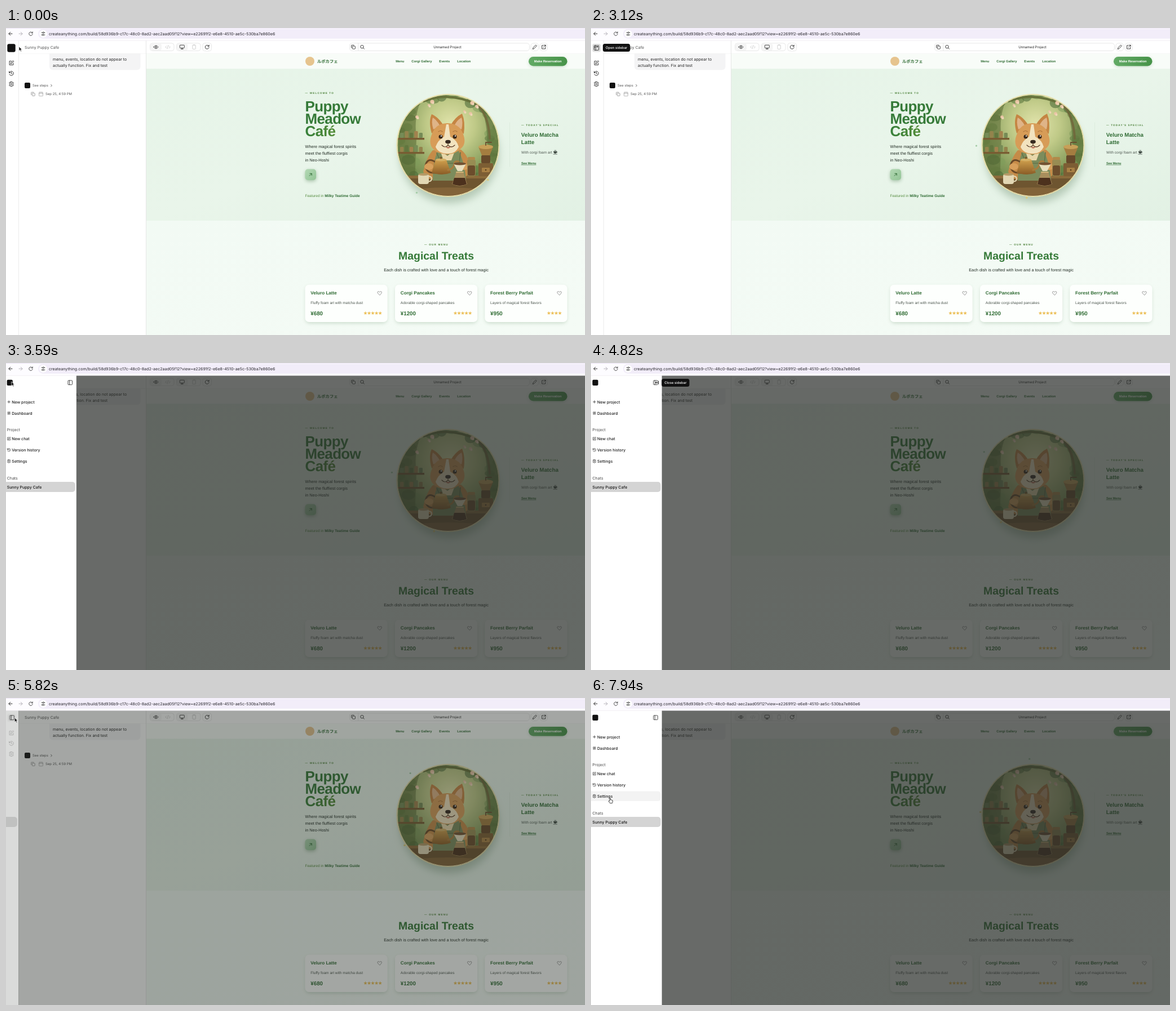
An HTML page that plays this animation: 1027x545 px, repeating every 8 s.

```html
<!DOCTYPE html>
<html lang="en">
<head>
<meta charset="utf-8">
<title>Builder preview</title>
<style>
html, body { margin: 0; width: 100%; height: 100%; overflow: hidden; background: #fff; }
svg { display: block; width: 1027px; height: 545px; }
text { text-rendering: geometricPrecision; white-space: pre; }
.ui { font-family: Inter, sans-serif; }
.web { font-family: "Liberation Sans", Arial, sans-serif; }
.jp { font-family: "Noto Sans CJK JP", "Noto Sans CJK", sans-serif; }
</style>
</head>
<body>
<svg id="stage" viewBox="0 0 1027 545" xmlns="http://www.w3.org/2000/svg">
<defs>
  <linearGradient id="hero" x1="0" y1="0" x2="1" y2="1">
    <stop offset="0" stop-color="#e6f4e8"/><stop offset=".5" stop-color="#e9f5ea"/><stop offset="1" stop-color="#e2f1e4"/>
  </linearGradient>
  <linearGradient id="menu" x1="0" y1="0" x2="1" y2="1">
    <stop offset="0" stop-color="#f2faf4"/><stop offset="1" stop-color="#f4fbf5"/>
  </linearGradient>
  <linearGradient id="cta"><stop offset="0" stop-color="#62aa65"/><stop offset="1" stop-color="#479349"/></linearGradient>
  <linearGradient id="go" x1="0" y1="0" x2="1" y2="1"><stop offset="0" stop-color="#b3d8b4"/><stop offset="1" stop-color="#93c596"/></linearGradient>
  <linearGradient id="word"><stop offset="0" stop-color="#37803a"/><stop offset="1" stop-color="#528b37"/></linearGradient>
  <radialGradient id="glow" cx=".52" cy=".3" r=".75">
    <stop offset="0" stop-color="#e2e4ac"/><stop offset=".3" stop-color="#c0ca88"/><stop offset=".62" stop-color="#869c5c"/><stop offset="1" stop-color="#56703f"/>
  </radialGradient>
  <linearGradient id="brass" x1="0" y1="0" x2="0" y2="1"><stop offset="0" stop-color="#d0a04d"/><stop offset="1" stop-color="#8a5c26"/></linearGradient>
  <filter id="soft" x="-30%" y="-30%" width="160%" height="170%"><feGaussianBlur stdDeviation="3"/></filter>
  <filter id="wide" x="-30%" y="-30%" width="160%" height="160%"><feGaussianBlur stdDeviation="7"/></filter>
  <clipPath id="disc"><circle cx="784" cy="208.5" r="90"/></clipPath>
</defs>
<g id="page"></g>
<g id="dots"></g>
<g id="rail"></g>
<rect id="shade" y="22" width="1027" height="523" fill="#282c28"/>
<g id="side"></g>
<g id="chrome"></g>
<g id="tips"></g>
<g id="cursor"></g>
</svg>
<script>
const $ = id => document.getElementById(id);
const rect = (x, y, w, h, fill, r = 0, more = '') =>
  `<rect x="${x}" y="${y}" width="${w}" height="${h}" rx="${r}" fill="${fill}" ${more}/>`;
const circ = (x, y, r, fill, more = '') => `<circle cx="${x}" cy="${y}" r="${r}" fill="${fill}" ${more}/>`;
const oval = (x, y, rx, ry, fill, more = '') => `<ellipse cx="${x}" cy="${y}" rx="${rx}" ry="${ry}" fill="${fill}" ${more}/>`;
const fillPath = (d, fill, more = '') => `<path d="${d}" fill="${fill}" ${more}/>`;
const line = (d, color = '#222', w = 0.8, more = '') =>
  `<path d="${d}" fill="none" stroke="${color}" stroke-width="${w}" stroke-linecap="round" stroke-linejoin="round" ${more}/>`;
const at = (x, y, body, s = 1) => `<g transform="translate(${x} ${y}) scale(${s})">${body}</g>`;
// cy is the middle of the capitals
const text = (x, cy, size, str, fill, cls = 'web', more = '') =>
  `<text x="${x}" y="${(cy + size * 0.36).toFixed(2)}" font-size="${size}" fill="${fill}" class="${cls}" ${more}>${str}</text>`;
const BOLD = 'font-weight="700"', MID = 'text-anchor="middle"', MEDIUM = 'font-weight="500"';
const SPACED = BOLD + ' letter-spacing="1.17"';
const GREEN = '#2f6b33';

// Icons, each drawn around 0,0 about 8 px wide
const icon = {
  edit: c => line('M0 -3.2H-3.4V3.6H3.4V0.4M-1.2 1.2L-.8 -.7L3 -4L4.2 -2.8L.7 .8Z', c, 0.9),
  history: c => line('M-3.6 -1.2A3.8 3.8 0 1 1 -3.5 1.6M-3.9 -3.4V-1.1H-1.6M0 -2V.2L1.6 1', c, 0.9),
  gear: c => line('M-1 -4H1L1.4 -2.8L2.8 -3.4L3.7 -1.8L2.9 -.7V.7L3.7 1.8L2.8 3.4L1.4 2.8L1 4H-1L-1.4 2.8L-2.8 3.4L-3.7 1.8L-2.9 .7V-.7L-3.7 -1.8L-2.8 -3.4L-1.4 -2.8Z', c, 0.9) + circ(0, 0, 1.3, 'none', `stroke="${c}" stroke-width=".9"`),
  panel: c => rect(-3.8, -3.8, 7.6, 7.6, 'none', 1, `stroke="${c}" stroke-width=".85"`) + line('M-1.3 -3.8V3.8', c, 0.85),
  plus: c => line('M-2.2 0H2.2M0 -2.2V2.2', c, 0.75),
  grid: c => [[-3, -3, 2.4, 3], [.6, -3, 2.4, 2], [-3, 1.2, 2.4, 1.8], [.6, .2, 2.4, 2.8]].map(b => rect(...b, 'none', .3, `stroke="${c}" stroke-width=".8"`)).join(''),
  eye: c => line('M-4 0Q0 -5.6 4 0Q0 5.6 -4 0Z', c) + circ(0, 0, 1.2, 'none', `stroke="${c}" stroke-width=".8"`),
  code: c => line('M-2.2 -2L-4.2 0L-2.2 2M2.2 -2L4.2 0L2.2 2M.8 -3L-.8 3', c),
  monitor: c => rect(-4, -3.5, 8, 5.2, 'none', .8, `stroke="${c}" stroke-width=".8"`) + line('M0 1.7V3.5M-2 3.6H2', c),
  tablet: c => rect(-2.7, -3.7, 5.4, 7.4, 'none', .8, `stroke="${c}" stroke-width=".8"`) + line('M-1 -3.6H1', c, 1.1),
  reload: c => line('M3 -1.6A3.4 3.4 0 1 0 3.4 .5M3.4 -3.6V-1.4H1.2', c, 0.9),
  copy: c => rect(-1.6, -1.6, 5, 5, 'none', .8, `stroke="${c}" stroke-width=".8"`) + line('M-3.4 1.2V-2.8Q-3.4 -3.4 -2.8 -3.4H1.2', c),
  search: c => circ(-.5, -.5, 2.7, 'none', `stroke="${c}" stroke-width=".9"`) + line('M1.5 1.5L3.5 3.5', c, 0.9),
  pencil: c => line('M-3.4 3.4L-2.8 1L2 -3.7L3.6 -2.1L-1.1 2.8Z', c, 0.85),
  out: c => line('M-.5 -2.9H-3.2V3.2H2.9V.6M.8 -3.4H3.4V-.8M3.2 -3.2L-.6 .6', c, 0.85),
  calendar: c => rect(-3.4, -3, 6.8, 6.5, 'none', .7, `stroke="${c}" stroke-width=".6"`) + line('M-3.4 -.9H3.4M-1.6 -3.8V-2.6M1.6 -3.8V-2.6', c, .6),
  heart: c => line('M0 3.4L-3.2 .2Q-4.2 -1.3 -3.3 -2.5Q-1.6 -4 0 -1.8Q1.6 -4 3.3 -2.5Q4.2 -1.3 3.2 .2Z', c, .75)
};
const ico = (name, x, y, c = '#222', s = 1) => at(x, y, icon[name](c), s);
const frame = (x, y, w, h, r) => rect(x, y, w, h, '#fff', r, 'stroke="#dedede" stroke-width=".7"');

function star(x, y) {
  let d = '';
  for (let i = 0; i < 10; i++) {
    const r = i % 2 ? 1.45 : 3.4, a = i * Math.PI / 5 - Math.PI / 2;
    d += (i ? 'L' : 'M') + (x + r * Math.cos(a)).toFixed(2) + ' ' + (y + r * Math.sin(a)).toFixed(2);
  }
  return fillPath(d + 'Z', '#ecc05a');
}

function chatPanel() {
  return rect(22, 22, 227, 523, '#fff') +
    rect(77, 40, 161.5, 34.5, '#f4f4f5', 6) + rect(22.6, 22, 226, 23, '#fff') +
    line('M23 45.5H248', '#f2f2f2', .6) + line('M248.6 22V545', '#dcdcdc', .8) +
    text(33, 34, 7, 'Sunny Puppy Cafe', '#555', 'ui') +
    text(83, 55.2, 7, 'menu, events, location do not appear to', '#222', 'ui') +
    text(83, 66, 7, 'actually function. Fix and test', '#222', 'ui') +
    rect(33, 97, 10, 10, '#111', 2) + text(47, 102, 6, 'See steps', '#555', 'ui') +
    line('M79.7 100.4L81.4 102.2L79.7 104', '#444', .8) +
    ico('copy', 48, 117.3, '#888', .95) + ico('calendar', 62, 117.3, '#888') +
    text(70, 117.3, 6, 'Sep 25, 4:59 PM', '#555', 'ui');
}

function toolbar() {
  return rect(249, 22, 778, 23.5, '#fff') + line('M249 45.3H1027', '#ececec', .6) +
    frame(255.5, 27, 42.5, 13.5, 4) + rect(256, 27.5, 20, 12.5, '#f5f5f5', 3.5) +
    ico('eye', 266, 33.8) + ico('code', 287, 33.8, '#c4c4c4') +
    frame(302.5, 27, 42.5, 13.5, 4) + rect(303, 27.5, 19.5, 12.5, '#f5f5f5', 3.5) +
    ico('monitor', 312.3, 33.8) + ico('tablet', 333.6, 33.8, '#c4c4c4') +
    frame(348.8, 26.8, 15.8, 14, 4) + ico('reload', 356.7, 33.8) +
    frame(609.5, 27, 319, 13.5, 4.5) + line('M624.8 27V40.5', '#dedede', .7) +
    ico('copy', 616, 33.8) + ico('search', 632, 33.8) +
    text(783, 33.4, 6.1, 'Unnamed Project', '#222', 'ui', MID) +
    frame(931, 27, 13.5, 13.5, 4.5) + ico('pencil', 937.8, 33.8) +
    frame(947, 27, 13.5, 13.5, 4.5) + ico('out', 953.8, 33.8);
}

function navBar() {
  const links = [['Menu', 691.3], ['Corgi Gallery', 719.3], ['Events', 768.3], ['Location', 800.3]];
  return rect(249, 45.5, 778, 27, '#f8fcf8') +
    circ(539, 59, 8, '#e6c48e') + text(552, 59, 7.3, 'ルポカフェ', GREEN, 'jp', BOLD) +
    links.map(([s, x]) => text(x, 59.2, 5.75, s, GREEN, 'web', BOLD)).join('') +
    rect(928, 53, 66.5, 16, '#4c8f50', 8, 'opacity=".3" filter="url(#soft)"') +
    rect(927, 51, 68.5, 16.5, 'url(#cta)', 8.2) +
    text(961.2, 59.2, 5.75, 'Make Reservation', '#fff', 'web', BOLD + ' ' + MID);
}

// Round picture: a corgi pouring coffee in a forest kitchen
function picture() {
  const leaf = i => {
    const a = i * 2.399, r = 74 + (i * 37 % 22);
    return oval((784 + r * Math.cos(a)).toFixed(1), (196 + r * Math.sin(a) * .95).toFixed(1), 9 + i % 5, 6 + i % 4, ['#54723a', '#6c8a48', '#7f9d5c', '#486636'][i % 4], 'opacity=".55"');
  };
  let s = rect(690, 115, 190, 190, 'url(#glow)');
  for (let i = 0; i < 44; i++) s += leaf(i);
  s += fillPath('M694 240L700 150Q722 122 742 118Q722 150 728 196L724 300H694Z', '#5a6b36', 'opacity=".55"') +
    fillPath('M846 124Q872 150 878 215L872 250L852 226Q858 170 838 130Z', '#5a713a', 'opacity=".6"') +
    line('M741 130Q784 112 836 136', '#67723b', 4) + line('M836 136Q856 155 858 196', '#71653a', 4, 'opacity=".8"');
  for (const y of [195, 220]) {
    s += rect(694, y, 48, 3.4, '#785c32');
    for (let i = 0; i < 5; i++) s += rect(699 + i * 8.4, y - 9 - i % 2 * 3, 6.4, 9 + i % 2 * 3, ['#93834c', '#62763f', '#a2824e', '#768b56'][(i + y) % 4], 1.5);
  }
  s += [[827, 133], [835, 139], [813, 148], [806, 162], [824, 152], [750, 137], [756, 131], [729, 158]].map(([x, y], i) =>
    circ(x, y, 3.6 - i % 3 * .8, '#eac4a4') + circ(x + 1.5, y + 2, 2, '#f0d6b8')).join('');
  // counter
  s += rect(690, 262, 190, 50, '#6e5530') + rect(690, 262, 190, 5, '#8b6b3b') + oval(783, 292, 72, 9, '#826339');
  // body and apron
  s += fillPath('M757 217Q746 229 740 255Q745 270 763 270H804Q825 262 823 248Q821 227 807 216Z', '#c58b48') +
    fillPath('M766 217L782 225L801 216Q813 233 816 271H757Q757 237 766 217Z', '#7c8c5c') +
    fillPath('M770 217L783 227L797 216L790 235H776Z', '#e8d7aa') +
    line('M764 222L772 240H804L806 221', '#61744a', 1.6);
  // ears and head
  s += fillPath('M755 187Q749 166 755 153Q767 158 776 173Z', '#c58543') + fillPath('M758 180Q754 168 757 159Q765 164 770 174Z', '#dfb488') +
    fillPath('M812 188Q815 166 809 152Q797 158 789 172Z', '#c58543') + fillPath('M808 180Q811 167 808 159Q799 164 795 174Z', '#dfb488') +
    fillPath('M756 187Q762 170 782 169Q803 169 810 186Q818 205 807 214Q796 225 782 224Q766 224 758 215Q748 205 756 187Z', '#d79c57') +
    fillPath('M781 171H785L788 193Q800 199 803 211Q797 224 783 223Q767 223 762 211Q766 199 777 193Z', '#f2e3bf') +
    circ(771, 193, 3.5, '#38281a') + circ(796, 193, 3.5, '#38281a') + circ(772, 191.7, 1.1, '#fff') + circ(797, 191.7, 1.1, '#fff') +
    line('M767 184Q771 181 774 184M793 184Q797 181 800 184', '#a8713a', 1.2) +
    oval(784, 202, 4.8, 3.3, '#372a20') + line('M784 205V208Q779 214 773 208M784 208Q790 214 796 208', '#5a3d28', 1.2) +
    fillPath('M780 211Q784 217 789 211Z', '#c07a62');
  // kettle and paw
  s += line('M763 239Q748 228 744 244Q745 258 761 257', '#6a4a28', 3) +
    fillPath('M762 234H781L789 257Q774 263 755 257Z', 'url(#brass)') + oval(771.5, 234, 9.5, 2.5, '#d5b065') + circ(771.5, 230.5, 2, '#7c5a2a') +
    line('M784 252Q795 250 795 240Q797 235 803 237', '#a87c3e', 3) +
    oval(750, 246, 8, 6, '#d7a05c') + oval(812, 246, 9, 6, '#d7a05c');
  // dripper and carafe
  s += fillPath('M794 241H816L809 254H801Z', '#e9dfbe') + oval(805, 241, 11, 2.6, '#735232') +
    fillPath('M799 255H811L818 277Q805 284 791 277Z', '#ad905e', 'opacity=".9"') + fillPath('M795 266H814L817 277Q805 283 792 277Z', '#4c311d') +
    line('M799 256H811', '#d2b57a', 2);
  // cup, jar and grinder
  s += rect(731, 259, 19, 18, '#e2d7b4', 4) + line('M750 263Q756 264 755 269Q753 273 750 272', '#e2d7b4', 2) + oval(740.5, 260, 9, 2.2, '#b59a68') +
    rect(818, 233, 15, 30, '#988a52', 4, 'opacity=".9"') + rect(819, 244, 13, 18, '#6b4d2c', 3) + rect(819, 229, 13, 5, '#b18a4a', 2) +
    fillPath('M838 211H864L858 226H844Z', '#a47d40') + oval(851, 211, 13, 4, '#c7a058') + line('M851 208V203H861', '#68502e', 1.8) +
    rect(843, 226, 16, 14, '#66492a', 2) + rect(838, 240, 26, 23, '#7d5e34', 2) + rect(844, 248, 14, 8, '#a88044', 1) + circ(851, 252, 1.3, '#553a1e');
  return circ(786, 223, 88, '#5d7f5f', 'opacity=".35" filter="url(#wide)"') +
    circ(784, 208.5, 91.5, '#e5dba0') + `<g clip-path="url(#disc)">${s}</g>` +
    circ(784, 208.5, 90, 'none', 'stroke="#f2e9bd" stroke-width="1"');
}

function heroPart() {
  const lead = ['Where magical forest spirits', 'meet the fluffiest corgis', 'in Neo-Hoshi'];
  const head = ['Puppy', 'Meadow', 'Café'];
  return rect(249, 72.3, 778, 270, 'url(#hero)') +
    text(530.5, 115, 4.6, '— WELCOME TO', '#4b8038', 'web', SPACED) +
    head.map((s, i) => text(530.5, 139 + i * 22, 26, s, i > 1 ? 'url(#word)' : '#357a38', 'web', BOLD + ' letter-spacing="-.65"')).join('') +
    lead.map((s, i) => text(530.5, 210.6 + i * 12.1, 7.35, s, '#222c24')).join('') +
    rect(531, 253, 19, 19, '#3f7043', 5, 'opacity=".4" filter="url(#soft)"') +
    rect(530.5, 250.5, 19.5, 19.5, 'url(#go)', 5) +
    line('M538.2 262.4L542.2 258.4M538.9 258.3H542.3V261.7', '#2c6630', .9) +
    text(530.5, 297.4, 6.5, `Featured in <tspan font-weight="700" fill="${GREEN}">Milky Teatime Guide</tspan>`, '#558b3f') +
    picture() + line('M893.5 168V246', '#d8e9da', .7) +
    text(914, 172.7, 4.6, "— TODAY'S SPECIAL", '#4b8038', 'web', SPACED) +
    text(913.8, 189, 9.75, 'Veluro Matcha', GREEN, 'web', BOLD) + text(913.8, 202.3, 9.75, 'Latte', GREEN, 'web', BOLD) +
    text(914, 220.2, 6.5, 'With corgi foam art', '#4c554e') +
    fillPath('M971 218.8H977.2Q977 222.8 974.1 223Q971.2 222.8 971 218.8Z', '#3f4a43') + line('M971 224H977.4M977 219.4Q979 220 977 221.6M973 217.3H975.5', '#3f4a43', .8) +
    text(914, 240.2, 5.65, 'See Menu', GREEN, 'web', BOLD) + line('M914 243.1H940', GREEN, .6);
}

function menuPart() {
  const cards = [
    [530.5, 'Veluro Latte', 'Fluffy foam art with matcha dust', '¥680', 5],
    [690, 'Corgi Pancakes', 'Adorable corgi-shaped pancakes', '¥1200', 5],
    [849.3, 'Forest Berry Parfait', 'Layers of magical forest flavors', '¥950', 4]
  ];
  let s = rect(249, 342, 778, 203, 'url(#menu)') +
    text(763.4, 384.4, 4.6, '— OUR MENU', '#4b8038', 'web', SPACED + ' ' + MID) +
    text(763, 404.3, 19.45, 'Magical Treats', '#357a38', 'web', BOLD + ' ' + MID) +
    text(763, 429.6, 7.37, 'Each dish is crafted with love and a touch of forest magic', '#222c24', 'web', MID);
  for (const [x, name, note, price, stars] of cards) {
    s += rect(x + 1, 459, 144, 65, '#5d8a62', 7, 'opacity=".28" filter="url(#soft)"') + rect(x, 455.7, 146.2, 66.3, '#fdfffd', 7) +
      text(x + 9.8, 470.5, 8.15, name, GREEN, 'web', BOLD) + ico('heart', x + 132.2, 470.7, '#777') +
      text(x + 9.8, 487.8, 6.55, note, '#4c554e') + text(x + 9.8, 506, 9.75, price, GREEN, 'web', BOLD);
    for (let i = 0; i < stars; i++) s += star(x + 133.2 - i * 6.55, 506.2);
  }
  return s;
}

function sidebar() {
  const rows = [['plus', 'New project', 69], ['grid', 'Dashboard', 89], ['edit', 'New chat', 134.3], ['history', 'Version history', 154.3], ['gear', 'Settings', 174.3]];
  return rect(-20, 22, 145.7, 523, '#fff') + rect(-6, 0, 129.7, 17.5, '#f3f3f3', 5, 'id="hot"') +
    rect(2.5, 29.8, 10.2, 10.2, '#111', 2) + ico('panel', 114.6, 34.8, '#333') +
    rows.map(([name, label, y]) => ico(name, 6, y, '#222', name === 'plus' ? 1 : .72) + text(11, y, 7, label, '#1c1c1c', 'ui', MEDIUM)).join('') +
    text(2.5, 118, 7, 'Project', '#4a4a4a', 'ui') + text(2.5, 204, 7, 'Chats', '#4a4a4a', 'ui') +
    rect(-8, 211, 131.6, 18, '#d4d4d4', 5) + text(2.5, 220, 7, 'Sunny Puppy Cafe', '#151515', 'ui', MEDIUM);
}

function browserBar() {
  const url = 'createanything.com/build/58d936b9-c17c-48c0-8ad2-aec2aad05f12?view=e22691f2-e6e8-4510-ae5c-530ba7e860e6';
  return rect(0, 0, 1027, 22.3, '#fdfcff') + rect(0, 0, 1027, 1, '#ece5f5') + rect(57, 1.8, 1000, 17, '#f2edf9', 8.5) +
    circ(66, 10.2, 6.8, '#fff') + line('M63 8.2H65M67.8 8.2H69M63 12.2H64.2M67 12.2H69', '#333', .9) +
    circ(66.4, 8.2, 1.2, 'none', 'stroke="#333" stroke-width=".9"') + circ(65.6, 12.2, 1.2, 'none', 'stroke="#333" stroke-width=".9"') +
    line('M11 10.2H5M7.8 7.3L4.9 10.2L7.8 13.1', '#333', 1) + line('M23 10.2H29M26.2 7.3L29.1 10.2L26.2 13.1', '#b5b2ba', 1) +
    ico('reload', 44, 10.2, '#333', .95) + text(76, 10.2, 7.1, url, '#26242a', 'ui') + line('M0 22.3H1027', '#e4e0e8', .5);
}

const tip = (id, x, w, label) => `<g id="${id}">${rect(x, 28, w, 14, '#111', 3.5)}${text(x + w / 2, 35, 6, label, '#fff', 'ui', MEDIUM + ' ' + MID)}</g>`;

$('page').innerHTML = chatPanel() + toolbar() + navBar() + heroPart() + menuPart();
$('dots').innerHTML = circ(0, 0, 1.6, '#a3cba6', 'id="mint"') + circ(0, 0, 1.8, '#dccb7b', 'id="gold"');
$('rail').innerHTML = rect(0, 22, 22, 523, '#fff') + line('M22.4 22V545', '#e2e2e2', .7) +
  rect(2.3, 28.3, 14.4, 14.4, '#111', 3, 'id="mark"') +
  `<g id="opener">${rect(2.3, 28, 15, 14.6, '#dfdfdf', 3.5)}${ico('panel', 9.6, 35.2, '#333', 1.1)}</g>` +
  ico('edit', 9.5, 62) + ico('history', 9.5, 80.5) + ico('gear', 9.5, 99.5);
$('side').innerHTML = sidebar();
$('chrome').innerHTML = browserBar();
$('tips').innerHTML = tip('openTip', 21, 48.3, 'Open sidebar') + tip('closeTip', 125.3, 49.2, 'Close sidebar');
const resize = line('M-2.4 -2.6V2.6M-1.4 0H2.6M1 -1.8L2.8 0L1 1.8', '#fff', 2) + line('M-2.4 -2.6V2.6M-1.4 0H2.6M1 -1.8L2.8 0L1 1.8', '#111', 1);
$('cursor').innerHTML =
  `<g id="arrow">${fillPath('M0 0V7.6L1.8 6L3.1 8.8L4.4 8.2L3.1 5.5H5.5Z', '#111', 'stroke="#fff" stroke-width=".6"')}</g>` +
  `<g id="hand">${fillPath('M-.8 1Q0 -.2 .9 .9V3.4Q1.8 2.8 2.3 3.7Q3.2 3.1 3.6 4.1Q4.7 3.7 4.7 5V6.8Q4.2 8 3.9 9.2H-.2Q-1.4 7.5 -2.7 5.7Q-2.3 4.4 -.8 5.5Z', '#fff', 'stroke="#111" stroke-width=".8" stroke-linejoin="round"')}</g>` +
  `<g id="east">${resize}</g><g id="west" transform="scale(-1 1)">${resize}</g>`;

function bezier(x1, y1, x2, y2) {
  const f = (a, b, s) => 3 * (1 - s) * (1 - s) * s * a + 3 * (1 - s) * s * s * b + s * s * s;
  return x => {
    if (x <= 0) return 0;
    if (x >= 1) return 1;
    let lo = 0, hi = 1;
    for (let i = 0; i < 24; i++) {
      const m = (lo + hi) / 2;
      if (f(x1, x2, m) < x) lo = m; else hi = m;
    }
    return f(y1, y2, lo);
  };
}
const glide = bezier(.4, 0, .2, 1), ease = bezier(.25, .1, .25, 1);

const LOOP = 8000, OPEN = 3146, CLOSE = 5000, REOPEN = 5710, WIDTH = 125.7;
const path = [[0, 23, 33], [150, 23, 33], [450, 17.2, 36], [2500, 17.2, 36], [2800, 9.5, 33], [4030, 9.5, 33], [4600, 117, 34.8],
  [5080, 117, 34.8], [5560, 15.3, 35], [6500, 15.3, 35], [7240, 21, 152], [7650, 33.8, 177.5], [LOOP, 33.8, 177.5]];

function pointer(t) {
  let i = 1;
  while (i < path.length - 1 && path[i][0] < t) i++;
  const [ta, xa, ya] = path[i - 1], [tb, xb, yb] = path[i];
  let k = (t - ta) / (tb - ta);
  k = k * k * (3 - 2 * k);
  return [xa + (xb - xa) * k, ya + (yb - ya) * k];
}

// slide: how far the drawer is out; fade: strength of the shade
function drawer(t) {
  if (t >= CLOSE && t < REOPEN) {
    const k = (t - CLOSE) / 300;
    return { slide: 1 - glide(k), fade: 1 - ease(k) };
  }
  const k = t - (t < CLOSE ? OPEN : REOPEN);
  return { slide: glide(k / 500), fade: ease(k / 320) };
}

const show = (id, on) => $(id).setAttribute('display', on ? 'inline' : 'none');
const orbit = (id, deg, r) => {
  const a = deg * Math.PI / 180;
  $(id).setAttribute('cx', 784 + r * Math.cos(a));
  $(id).setAttribute('cy', 208.5 + r * Math.sin(a));
};

function draw(t) {
  const [x, y] = pointer(t), { slide, fade } = drawer(t);
  orbit('mint', 123.5 + t * .018, 100.5);
  orbit('gold', 40.7 + t * .018, 93.5);

  $('shade').setAttribute('opacity', .7 * fade);
  $('side').setAttribute('opacity', fade);
  $('side').setAttribute('transform', `translate(${(slide - 1) * WIDTH} 0)`);
  show('side', slide > 0);

  const shut = slide === 0, full = slide > .95;
  const overMark = x < 18 && y < 43;
  const onRail = shut && overMark;
  const onClose = full && x > 107 && x < 123 && y < 43;
  const row = full && x < 124 ? [69, 89, 134.3, 154.3, 174.3, 220].find(c => Math.abs(y - c) < 9.5) : 0;
  show('opener', overMark);
  show('mark', !overMark);
  show('openTip', onRail && t > 520 && t < OPEN);
  show('closeTip', onClose && t > 4640 && t < CLOSE);
  show('hot', row && row < 200);
  if (row) $('hot').setAttribute('y', row - 8.7);

  $('cursor').setAttribute('transform', `translate(${x} ${y})`);
  show('east', onRail);
  show('west', onClose);
  show('hand', row);
  show('arrow', !onRail && !onClose && !row);
}

function tick() {
  draw(performance.now() % LOOP);
  requestAnimationFrame(tick);
}
tick();
</script>
</body>
</html>
```
